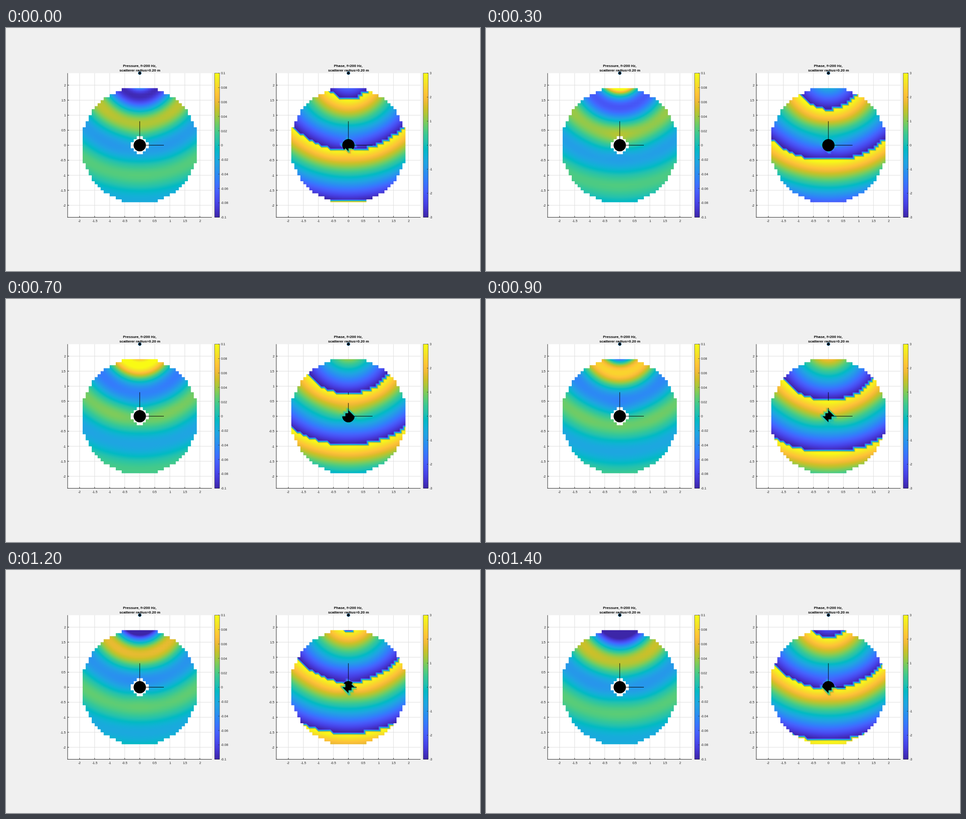
A matplotlib script for the animation above (1.5 s loop, 1045 by 536 pixels).

```python
import numpy as np
import matplotlib.pyplot as plt
from matplotlib.animation import FuncAnimation
from matplotlib.colors import LinearSegmentedColormap
from matplotlib.patches import Circle, Rectangle

WIDTH, HEIGHT, DPI = 1045, 536, 100
FRAMES, INTERVAL = 15, 100
PX = 72 / DPI                       # points per pixel
UNIT = 66.25                        # pixels per metre
LEFT_X, RIGHT_X, MID_Y = 294.9, 754.9, 258.6
HALF = 159                          # half plot size in pixels
LIMIT, STEP = 2.0, 0.1              # field radius and grid spacing
RADIUS, SOURCE_Y = 0.2, 2.4
WAVE_K = 2 * np.pi * 200 / 343.5
AXIS_LENGTH, AXIS_Z = 0.8, 2.0
SUB = 3                             # samples per pixel side
MARGIN = 130                        # field image reach around its centre
BOX = 2 * MARGIN + 1
INK = "#262626"

PARULA = LinearSegmentedColormap.from_list("parula", [
    (.242, .150, .660), (.265, .198, .795), (.278, .256, .899),
    (.281, .323, .958), (.270, .389, .991), (.221, .460, .997),
    (.179, .529, .968), (.154, .590, .922), (.125, .646, .888),
    (.069, .695, .839), (.007, .731, .766), (.141, .758, .684),
    (.216, .784, .592), (.341, .801, .479), (.504, .799, .348),
    (.672, .779, .223), (.820, .750, .154), (.939, .729, .210),
    (.997, .766, .220), (.979, .839, .177), (.960, .914, .142),
    (.977, .984, .081)])


def hankel(order, x):
    """Outgoing spherical Hankel functions of orders 0..order."""
    h = [1j * np.exp(-1j * x) / x]
    h.append(h[0] * (1 / x + 1j))
    for n in range(1, order):
        h.append((2 * n + 1) / x * h[n] - h[n - 1])
    return h


def scattered_field(x, y, order=7):
    """Point source above a rigid sphere."""
    direct = np.hypot(x, y - SOURCE_Y)
    r = np.maximum(np.hypot(x, y), RADIUS)
    cosine = y / r
    ka = WAVE_K * RADIUS
    surface = hankel(order, ka)
    near = hankel(order, WAVE_K * r)
    far = hankel(order, WAVE_K * SOURCE_Y)
    field = np.exp(-1j * WAVE_K * direct) / (4 * np.pi * direct)
    for n in range(order):
        slope = n / ka * surface[n] - surface[n + 1]
        legendre = np.polynomial.legendre.legval(cosine, [0] * n + [1])
        field = field + (1j * WAVE_K / (4 * np.pi) * (2 * n + 1)
                         * slope.real / slope * near[n] * far[n] * legendre)
    return field


nodes = np.linspace(-LIMIT, LIMIT, 41)
grid_x, grid_y = np.meshgrid(nodes, nodes)
grid_r = np.hypot(grid_x, grid_y)
inside = grid_r <= RADIUS + 1e-6
outside = grid_r > LIMIT + 1e-6
field = scattered_field(grid_x, grid_y)

# Sample positions in metres, measured from the plot centre.
pixels = (np.arange(BOX * SUB) + 0.5) / SUB - MARGIN
sample_x, sample_y = np.meshgrid((pixels - LEFT_X % 1) / UNIT,
                                 (MID_Y % 1 - pixels) / UNIT)
cell_x = np.floor((sample_x + LIMIT) / STEP).astype(int)
cell_y = np.floor((sample_y + LIMIT) / STEP).astype(int)
frac_x = (sample_x + LIMIT) / STEP - cell_x
frac_y = (sample_y + LIMIT) / STEP - cell_y

half_line = 0.5 / UNIT
on_axis = (((abs(sample_x) < half_line) & (sample_y > 0) & (sample_y < AXIS_LENGTH))
           | ((abs(sample_y) < half_line) & (sample_x > 0) & (sample_x < AXIS_LENGTH)))
on_disc = np.hypot(sample_x, sample_y) < RADIUS + 0.3 / UNIT
black_z = np.where(on_axis, AXIS_Z, np.where(on_disc, 0, -np.inf))


def surface_height(values):
    """Interpolate over grid cells split along the falling diagonal."""
    v00 = values[cell_y, cell_x]
    v10 = values[cell_y, cell_x + 1]
    v01 = values[cell_y + 1, cell_x]
    v11 = values[cell_y + 1, cell_x + 1]
    lower = v00 + frac_x * (v10 - v00) + frac_y * (v01 - v00)
    upper = v11 + (1 - frac_x) * (v01 - v11) + (1 - frac_y) * (v10 - v11)
    height = np.where(frac_x + frac_y <= 1, lower, upper)
    return np.where(np.isnan(v00 + v10 + v01 + v11), np.nan, height)


def render(values, limit):
    """Top view of the surface with the disc and axis lines, as RGBA."""
    z = surface_height(values)
    empty = np.isnan(z)
    rgba = PARULA(np.clip((np.where(empty, 0, z) + limit) / (2 * limit), 0, 1))
    rgba[empty] = 0
    rgba[black_z >= np.where(empty, -1e3, z)] = (0, 0, 0, 1)
    rgba = rgba.reshape(BOX, SUB, BOX, SUB, 4).mean(axis=(1, 3))
    rgba[..., :3] /= np.maximum(rgba[..., 3:], 1e-6)
    return np.clip(rgba, 0, 1)


def pressure_at(turn):
    values = (field * turn).real
    values[inside | outside] = np.nan
    return values


def phase_at(turn):
    values = np.angle(field * turn)
    values[inside] = 0
    values[outside] = np.nan
    return values


plt.rcParams["font.family"] = "Liberation Sans"
fig = plt.figure(figsize=(WIDTH / DPI, HEIGHT / DPI), dpi=DPI, facecolor="#f0f0f0")
ax = fig.add_axes([0, 0, 1, 1])
ax.axis("off")


def line(x0, y0, x1, y1, color=INK, width=1, z=3):
    ax.plot([x0, x1], [y0, y1], color=color, lw=width * PX, zorder=z,
            solid_capstyle="butt", snap=False)


def label(x, y, text, align, size=7.35, **style):
    style.setdefault("color", INK)
    ax.text(x, y, text, ha=align, va="baseline", fontsize=size * PX, zorder=6, **style)


def draw_panel(cx, name, limit, ticks):
    left, right = cx - HALF, cx + HALF
    top, bottom = MID_Y - HALF, MID_Y + HALF
    ax.add_patch(Rectangle((left, top), 2 * HALF, 2 * HALF, fc="white", ec="none",
                           zorder=0, snap=False))

    for value in np.arange(-2, 2.5, 0.5):
        gx, gy = cx + value * UNIT, MID_Y - value * UNIT
        line(gx, top, gx, bottom, "#dedede", z=1)
        line(left, gy, right, gy, "#dedede", z=1)
        line(gx, bottom, gx, bottom - 3)
        line(left, gy, left + 3, gy)
        label(gx, 428.5, f"{value:g}", "center")
        label(left - 4, gy + 2.7, f"{value:g}", "right")
    line(left, top, left, bottom + 0.5)
    line(left - 0.5, bottom, right, bottom)

    bar_left, bar_width = right + 6, 11
    bar_right = bar_left + bar_width
    ax.imshow(np.linspace(1, 0, 256)[:, None], cmap=PARULA, aspect="auto", zorder=2,
              extent=(bar_left, bar_right, bottom, top))
    ax.add_patch(Rectangle((bar_left, top), bar_width, 2 * HALF, fc="none",
                           ec=INK, lw=0.6 * PX, zorder=3, snap=False))
    for value in ticks:
        y = MID_Y - value / limit * HALF
        line(bar_right - 3, y, bar_right, y, width=0.7)
        label(bar_right + 3, y + 2.7, f"{value:g}", "left")

    for y, text in ((86, f"{name}, f=200 Hz,"), (96, "scatterer radius=0.20 m")):
        label(cx, y, text, "center", 8, color="black", weight="bold")
    ax.add_patch(Circle((cx, top), 3.3, fc="black", ec="#0072bd", lw=0.7 * PX, zorder=7))

    x0, y0 = int(cx) - MARGIN, int(MID_Y) - MARGIN
    return ax.imshow(np.zeros((BOX, BOX, 4)), aspect="auto", zorder=2,
                     interpolation="nearest", extent=(x0, x0 + BOX, y0 + BOX, y0))


pressure_image = draw_panel(LEFT_X, "Pressure", 0.1, np.arange(-5, 6) / 50)
phase_image = draw_panel(RIGHT_X, "Phase", 3, range(-3, 4))
ax.set_xlim(0, WIDTH)
ax.set_ylim(HEIGHT, 0)


def update(frame):
    turn = np.exp(2j * np.pi * frame / FRAMES)
    pressure_image.set_data(render(pressure_at(turn), 0.1))
    phase_image.set_data(render(phase_at(turn), 3))
    return pressure_image, phase_image


anim = FuncAnimation(fig, update, frames=FRAMES, interval=INTERVAL, repeat=True,
                     repeat_delay=0, blit=False)
plt.show()
```
